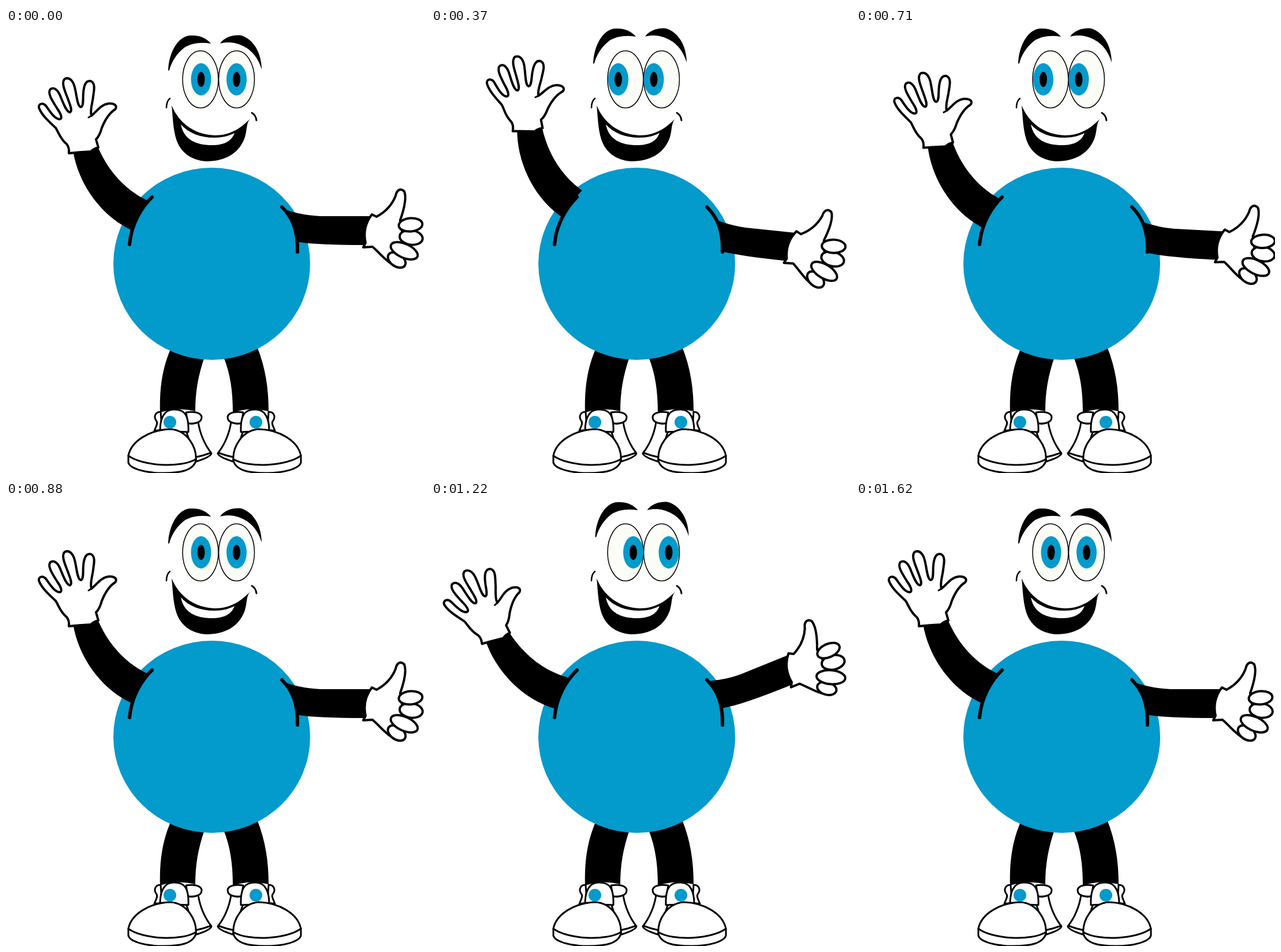
Recreate the animation shown at these times as an HTML page. Size 726 px wide and 771 px high, loop 1820 ms.

```html
<!DOCTYPE html>
<html lang="en">
<head>
<meta charset="utf-8">
<title>Waving mascot</title>
<style>
  html, body { margin: 0; width: 100%; height: 100%; overflow: hidden; background: #fff; }
  svg { display: block; width: 100vw; height: 100vh; }
  .line { fill: none; stroke: #000; stroke-linecap: round; stroke-linejoin: round; }
  .white { fill: #fff; stroke: #000; stroke-width: 4; stroke-linecap: round; stroke-linejoin: round; }
  .shoe { stroke-width: 3; }
  .blue { fill: #039acc; }
</style>
</head>
<body>
<svg viewBox="0 0 726 771">
  <defs>
    <clipPath id="leftSide"><path d="M0,0H300V240L254,290L235,318L222,345L214,380L0,420Z"/></clipPath>
    <clipPath id="rightSide"><path d="M466,0V290L480,310L494,330L503,352L506,392L726,771V0Z"/></clipPath>
    <g id="shoe" class="white shoe">
      <path d="M268,665C258,665 256,674 260,680C264,684 260,690 257,698L270,696Z"/>
      <path d="M312,666C325,664 338,666 339,674C339,684 328,686 315,685Z"/>
      <path d="M316,685Q326,687 333,683C337,708 346,724 356,737Q355,743 330,751L312,698Z"/>
      <path d="M327,744Q342,741 355,736" fill="none"/>
      <path d="M267,698C267,678 273,661 290,661C309,660 317,670 316,700Z"/>
      <path d="M212,741C217,715 250,696 285,695C314,697 331,726 329,750C324,766 305,771 272,771C243,771 215,764 212,753Z"/>
      <path d="M212,741C236,759 303,763 329,747" fill="none"/>
    </g>
  </defs>

  <path d="M287,552C270,590 266,625 267,666Q298,656 328,664C328,630 333,602 344,570Z"/>
  <path d="M377,570C389,600 393,630 393,666Q424,656 455,664C455,625 450,590 435,552Z"/>
  <use href="#shoe"/>
  <use href="#shoe" transform="translate(723) scale(-1 1)"/>
  <circle class="blue" cx="284" cy="683" r="11"/>
  <circle class="blue" cx="433" cy="683" r="11"/>

  <ellipse class="blue" cx="356.5" cy="408.5" rx="170.5" ry="166.5"/>

  <g clip-path="url(#leftSide)">
    <path id="leftArm" d="M116,212C124,265 160,322 215,349L250,367L290,330L245,299C205,280 175,245 158,203Z"/>
  </g>
  <g id="leftHand">
    <path class="white" d="M109,217Q110,207 105,201C93,191 91,180 86,173C77,164 62,152 57,138C56,130 65,129 70,136C77,146 85,158 93,158
      C99,157 94,147 89,140C80,126 71,112 77,106C84,101 91,109 95,120C100,132 105,146 111,146C116,143 110,131 107,122C102,109 95,94 102,88
      C112,84 118,95 120,107C123,120 124,137 130,137C135,135 133,121 134,112C135,100 138,90 147,92C156,96 152,110 151,119C150,130 145,142 148,152
      C158,144 164,133 177,131C188,130 194,135 189,141C178,148 170,163 166,173C163,184 159,190 156,193L160,207Q152,209 147,214Q127,215 109,217Z"/>
    <path class="line" stroke-width="3" d="M148,152L143,155"/>
  </g>
  <g clip-path="url(#rightSide)">
    <path id="rightArm" d="M634,326H545C520,325 500,320 485,315L450,300V362L508,371Q540,376 622,376Z"/>
  </g>
  <g id="rightHand" class="white">
    <path d="M634,323L642,327C657,319 669,306 675,291C677,280 684,277 690,283C695,295 689,316 683,333L690,375L672,411
      C658,404 649,391 635,379L619,380L623,372Q617,345 634,323Z"/>
    <ellipse cx="677" cy="402" rx="17" ry="11" transform="rotate(35 677 402)"/>
    <ellipse cx="690" cy="386" rx="25" ry="12" transform="rotate(24 690 386)"/>
    <ellipse cx="702" cy="363" rx="20" ry="12.5" transform="rotate(8 702 363)"/>
    <ellipse cx="701" cy="341" rx="20.5" ry="11.5" transform="rotate(-5 701 341)"/>
  </g>
  <path class="line" stroke-width="6" d="M253,293C235,310 217,340 214,375"/>
  <path class="line" stroke-width="6" d="M478,310C496,328 506,350 505,388"/>

  <g id="brows">
    <path d="M281,74C282,40 300,13 320,13C336,12 348,18 355,27C338,24 321,26 309,34C296,44 287,58 283,73Z"/>
    <path d="M371,27C378,16 394,11 408,13C430,20 443,45 443,72C437,52 427,40 414,33C400,25 385,23 371,27Z"/>
  </g>
  <g fill="#fdfdf8" stroke="#000" stroke-width="1.5">
    <ellipse cx="337" cy="89" rx="31" ry="49.5"/>
    <ellipse cx="399.5" cy="89" rx="31" ry="49.5"/>
  </g>
  <g id="irises">
    <ellipse class="blue" cx="338" cy="89" rx="17.5" ry="28"/>
    <ellipse class="blue" cx="399.5" cy="89" rx="17.5" ry="28"/>
    <ellipse cx="338" cy="89" rx="6.5" ry="13"/>
    <ellipse cx="399.5" cy="89" rx="6.5" ry="13"/>
  </g>

  <path d="M287,134C300,166 328,185 362,186C389,186 408,173 423,157C416,165 418,176 414,189C405,216 381,231 347,231C319,229 302,214 295,193C289,174 289,152 287,134Z"/>
  <path fill="#fff" d="M303,167C316,182 337,190 361,190C375,190 386,187 396,182C390,198 375,203 357,203C330,203 308,194 303,167Z"/>
  <path class="line" stroke-width="2.5" d="M284,122Q278,127 278,138"/>
  <path class="line" stroke-width="3" d="M426,147Q433,151 434,160"/>
</svg>
<script>
const LOOP = 1820;
const part = id => document.getElementById(id);

// Faces: brow shift x, y and iris shift
const ahead = [0, 0, 0];
const lookLeft = [0, -12, -13.5];
const lookRight = [3.5, -11, 12.5];

// Arms: wrist shift x, y, then turn of hand and of arm in degrees
const rest = [0, 0, 0, 0];
const waveIn = [26, -28, 3.5, 8];
const thumbLow = [-4, 28, 7, 6];

const poses = [
  { end: 170, face: ahead, left: rest, right: rest },
  { end: 370, face: lookLeft, left: waveIn, right: thumbLow },
  { end: 540, face: lookLeft, left: [33, -36, 5, 10], right: thumbLow },
  { end: 710, face: lookLeft, left: waveIn, right: [5, 19, 1.5, 1.5] },
  { end: 880, face: lookLeft, left: [8, -9, 1, 3], right: [4, 26, 2, 3] },
  { end: 1050, face: ahead, left: rest, right: rest },
  { end: 1220, face: lookRight, left: [-33, 49, -16.5, -14.5], right: [-9, -70, -23, -26] },
  { end: 1390, face: lookRight, left: [-22, 26, -10.5, -9.5], right: [-5, -58, -19, -22] },
  { end: 1620, face: lookRight, left: [-19, 21, -9.5, -8.5], right: [-10, -86, -26.5, -30] },
  { end: LOOP, face: ahead, left: rest, right: rest }
];

function shift(id, x, y) {
  part(id).setAttribute("transform", `translate(${x} ${y})`);
}

function swing(side, [dx, dy, hand, arm], x, y) {
  const turn = angle => `translate(${dx} ${dy}) rotate(${angle} ${x} ${y})`;
  part(side + "Hand").setAttribute("transform", turn(hand));
  part(side + "Arm").setAttribute("transform", turn(arm));
}

function draw(time) {
  const { face, left, right } = poses.find(pose => time < pose.end);
  shift("brows", face[0], face[1]);
  shift("irises", face[2], 0);
  swing("left", left, 134, 212);
  swing("right", right, 626, 351);
}

const start = performance.now();
function tick() {
  draw((performance.now() - start) % LOOP);
  requestAnimationFrame(tick);
}
tick();
</script>
</body>
</html>
```
